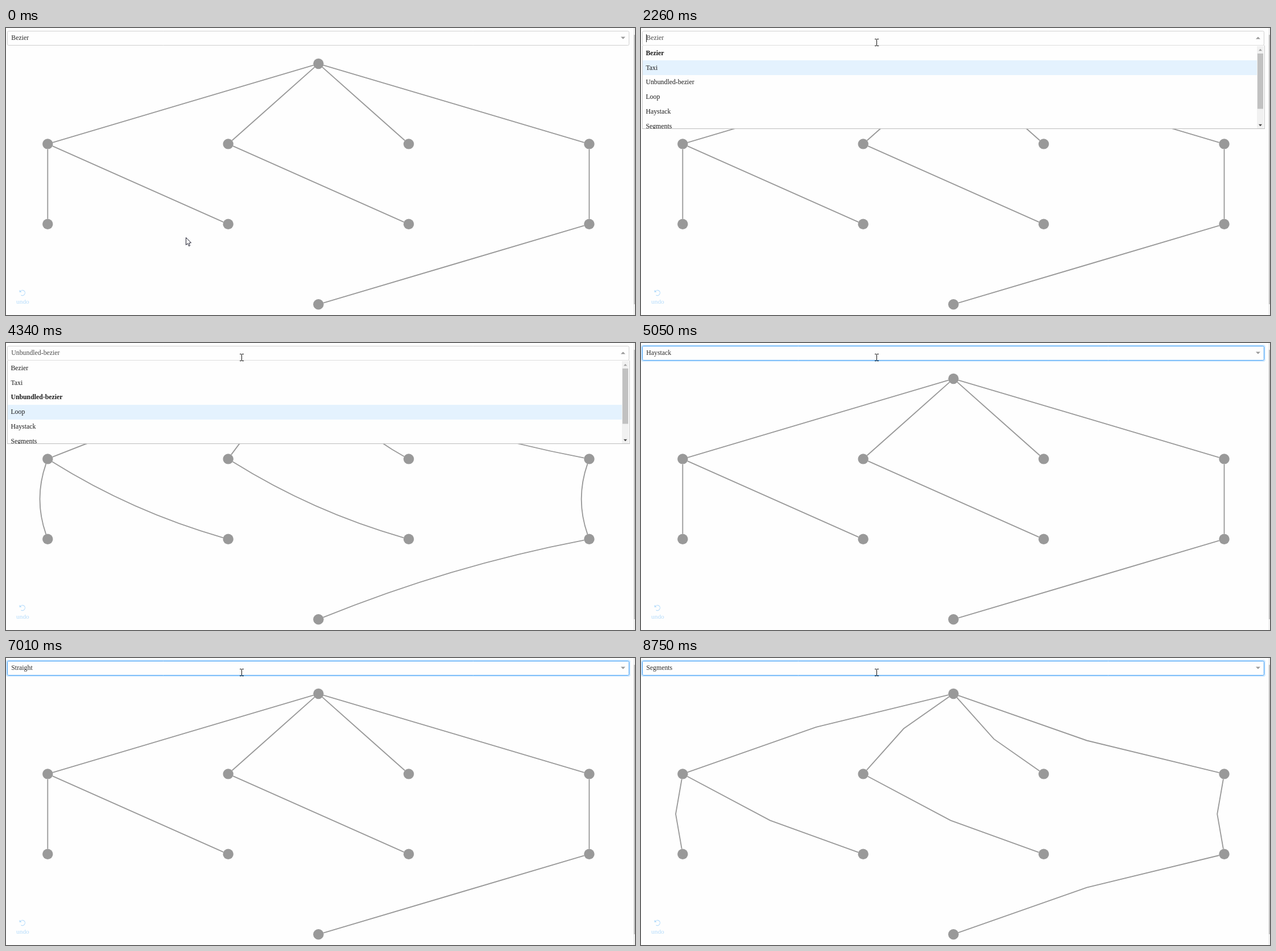
Animation of 1106 by 506 pixels, one loop 9.88 s. Source, as an HTML page with a canvas:

```html
<!DOCTYPE html>
<html lang="en">
<head>
<meta charset="utf-8">
<title>Edge styles</title>
<style>
  html, body { margin: 0; width: 100%; height: 100%; overflow: hidden; background: #fefefe; }
  canvas { display: block; }
</style>
</head>
<body>
<canvas id="stage" width="1106" height="506"></canvas>
<script>
const ctx = document.getElementById('stage').getContext('2d');
const LOOP = 9880;
const FONT = '"Liberation Serif", "Times New Roman", serif';
const PAPER = '#fefefe';
const OPTIONS = ['Bezier', 'Taxi', 'Unbundled-bezier', 'Loop', 'Haystack', 'Segments', 'Straight'];
const ROW = 25.8, LIST_TOP = 31.4, LIST_BOTTOM = 177;
const ZOOM = 0.615;

// Each step changes part of the state and holds until the next one.
const STEPS = [
  [0, { value: 0, open: false, focus: false, active: 0, scroll: 0, caret: false, arrow: [316, 369] }],
  [430, { arrow: [331, 262] }],
  [570, { arrow: [366, 158] }],
  [690, { arrow: [403, 52] }],
  [840, { arrow: [409, 36] }],
  [970, { arrow: [412, 25] }],
  [1240, { arrow: null, open: true, focus: true, caret: true }],
  [1830, { caret: false }],
  [2260, { caret: true, active: 1 }],
  [2390, { active: 2 }],
  [2670, { active: 3 }],
  [2820, { caret: false }],
  [2950, { active: 2 }],
  [3250, { value: 2, open: false }],
  [3810, { open: true }],
  [4340, { active: 3 }],
  [4620, { active: 4 }],
  [5050, { value: 4, open: false }],
  [5480, { open: true }],
  [5760, { active: 5, scroll: 7.2 }],
  [6010, { active: 6, scroll: 33 }],
  [7010, { value: 6, open: false }],
  [7300, { open: true }],
  [7750, { active: 5 }],
  [8750, { value: 5, open: false }]
];

const node = (column, row) => [73.3 + 317.4 * column, 63 + 141.4 * row];
const root = node(1.5, 0), leaf = node(1.5, 3);
const upper = [0, 1, 2, 3].map(c => node(c, 1));
const lower = [0, 1, 2, 3].map(c => node(c, 2));
const EDGES = [
  ...upper.map(n => [root, n]),
  [upper[0], lower[0]], [upper[0], lower[1]], [upper[1], lower[2]], [upper[3], lower[3]],
  [lower[3], leaf]
];

function rect(x, y, w, h, color) {
  ctx.fillStyle = color;
  ctx.fillRect(x, y, w, h);
}

function polygon(points, fill, stroke) {
  ctx.beginPath();
  points.forEach(p => ctx.lineTo(...p));
  ctx.closePath();
  ctx.fillStyle = fill;
  ctx.fill();
  if (stroke) {
    ctx.strokeStyle = stroke;
    ctx.lineWidth = 1;
    ctx.stroke();
  }
}

function triangle(x, y, half, height, color) {
  polygon([[x - half, y + height / 2], [x + half, y + height / 2], [x, y - height / 2]], color);
}

function text(label, x, y, color, size = 11.8, weight = 'normal') {
  ctx.font = `${weight} ${size}px ${FONT}`;
  ctx.fillStyle = color;
  ctx.fillText(label, x, y);
}

// Point on the rim of the node at p, facing q.
function rim(p, q) {
  const k = 15 * ZOOM / Math.hypot(q[0] - p[0], q[1] - p[1]);
  return [p[0] + (q[0] - p[0]) * k, p[1] + (q[1] - p[1]) * k];
}

function drawEdge(a, b, style) {
  const dx = b[0] - a[0], dy = b[1] - a[1];
  const bend = { 'Unbundled-bezier': 40, Segments: 20 }[style] || 0;
  const k = bend * ZOOM / Math.hypot(dx, dy);
  const mid = [(a[0] + b[0]) / 2 - dy * k, (a[1] + b[1]) / 2 + dx * k];
  ctx.beginPath();
  ctx.moveTo(...rim(a, mid));
  if (style === 'Unbundled-bezier') {
    ctx.quadraticCurveTo(...mid, ...rim(b, mid));
  } else {
    ctx.lineTo(...mid);
    ctx.lineTo(...rim(b, mid));
  }
  ctx.stroke();
}

function drawGraph(style) {
  ctx.strokeStyle = ctx.fillStyle = '#999';
  ctx.lineWidth = 3 * ZOOM;
  EDGES.forEach(([a, b]) => drawEdge(a, b, style));
  [root, ...upper, ...lower, leaf].forEach(([x, y]) => {
    ctx.beginPath();
    ctx.arc(x, y, 15 * ZOOM, 0, 2 * Math.PI);
    ctx.fill();
  });
}

function drawUndo() {
  const color = '#b5dcfb';
  ctx.strokeStyle = color;
  ctx.lineWidth = 1.1;
  ctx.beginPath();
  ctx.arc(28.8, 467, 4.6, -2.5, 2.1);
  ctx.stroke();
  polygon([[23.6, 461.8], [23.6, 466], [27.6, 465.6]], color);
  text('undo', 18, 486, color, 11.4);
}

function drawPageScrollbar() {
  rect(1103, 0, 3, 506, '#f1f1f1');
  rect(1104, 12, 2, 475, '#c1c1c1');
}

function drawField({ value, open, focus, caret }) {
  const lit = focus && !open;
  if (lit) {
    ctx.strokeStyle = 'rgba(24,144,255,0.2)';
    ctx.lineWidth = 2;
    ctx.beginPath();
    ctx.roundRect(1, 4, 1096, 28, 3);
    ctx.stroke();
  }
  ctx.beginPath();
  ctx.roundRect(2.5, 5.5, 1093, 25, 2);
  ctx.fillStyle = PAPER;
  ctx.fill();
  ctx.strokeStyle = lit ? '#3b9cf5' : '#cfcfcf';
  ctx.lineWidth = 1;
  ctx.stroke();
  text(OPTIONS[value], 9.3, 21.4, open ? '#4c4c4c' : '#2b2b2b');
  triangle(1085, 17.5, 4, open ? 4 : -4, '#999');
  if (caret) rect(9, 11, 1, 14, '#222');
}

function drawList({ value, active, scroll }) {
  rect(2, 31, 1095, 147, PAPER);
  ctx.save();
  ctx.beginPath();
  ctx.rect(3, 31, 1093, LIST_BOTTOM - 31);
  ctx.clip();
  OPTIONS.forEach((label, i) => {
    const top = LIST_TOP + i * ROW - scroll;
    if (i === active) {
      const y = Math.round(top);
      rect(3, y, 1080, Math.round(top + ROW) - y, '#e4f2fe');
    }
    text(label, 8.4, Math.round(top + 16.3), '#1c1c1c', 11.8, i === value ? 'bold' : 'normal');
  });
  ctx.restore();
  rect(1083, 32, 12, 145, '#f1f1f1');
  rect(1084, 45 + scroll * 0.65, 10, 97.5, '#c1c1c1');
  triangle(1089, 38.5, 3, 3.5, scroll ? '#404040' : '#a0a0a0');
  triangle(1089, 171.5, 3, -3.5, '#404040');
  rect(3, 30, 1093, 1, '#dedede');
  rect(2, 31, 1, 147, '#c8c8c8');
  rect(1096, 31, 1, 147, '#c8c8c8');
  rect(2, 177, 1095, 1, '#bdbdbd');
}

function drawPointer(arrow) {
  if (arrow) {
    const shape = [[0, 0], [0, 13], [3, 10.3], [5, 15], [7, 14.2], [5.2, 9.6], [9, 9.2]];
    polygon(shape.map(([x, y]) => [arrow[0] + 0.5 + x, arrow[1] + 0.5 + y]), '#fff', '#1a1a2a');
    return;
  }
  rect(414, 20, 1, 11, '#111');
  [19, 31].forEach(y => {
    rect(411, y, 3, 1, '#111');
    rect(415, y, 3, 1, '#111');
  });
}

function frame(now) {
  const t = now % LOOP;
  const state = Object.assign({}, ...STEPS.filter(s => s[0] <= t).map(s => s[1]));
  rect(0, 0, 1106, 506, PAPER);
  drawGraph(OPTIONS[state.value]);
  drawUndo();
  drawPageScrollbar();
  drawField(state);
  if (state.open) drawList(state);
  drawPointer(state.arrow);
  requestAnimationFrame(() => frame(performance.now() - start));
}

const start = performance.now();
frame(0);
</script>
</body>
</html>
```
